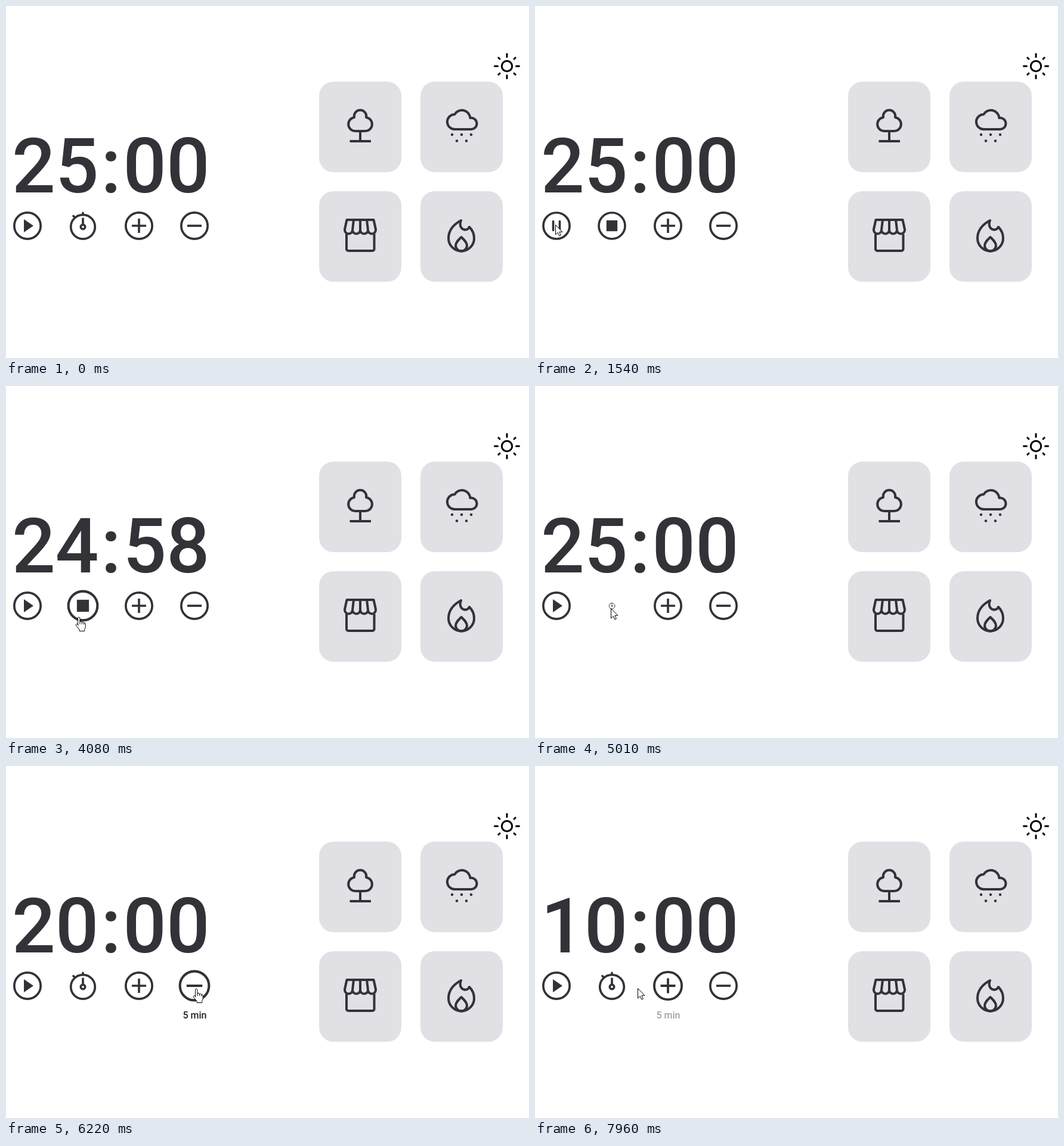
Write an HTML page that moves like this. It is 877 px wide and 591 px high and loops after 8000 ms.

```html
<!DOCTYPE html>
<html lang="en">
<head>
<meta charset="utf-8">
<title>Focus timer</title>
<style>
  html, body { margin: 0; width: 100%; height: 100%; overflow: hidden; background: #fff; }
  svg { display: block; width: 877px; height: 591px; font-family: Roboto, sans-serif; font-weight: 500; text-anchor: middle; }
  .line { fill: none; stroke: #323238; stroke-width: 4; stroke-linejoin: round; }
  .button { fill: none; stroke: #323238; stroke-width: 3.7; }
  .solid { fill: #323238; stroke: none; }
  .round { stroke-linecap: round; }
  .digits { font-size: 128px; fill: #323238; }
  .label { font-size: 16px; fill: #202024; }
  .cursor { fill: #fff; stroke: #000; stroke-width: 1; stroke-linejoin: round; }
</style>
</head>
<body>
<svg viewBox="0 0 877 591">
  <g fill="#e1e0e5">
    <rect x="525" y="127" width="138" height="152" rx="24"/>
    <rect x="695" y="127" width="138" height="152" rx="24"/>
    <rect x="525" y="311" width="138" height="152" rx="24"/>
    <rect x="695" y="311" width="138" height="152" rx="24"/>
  </g>

  <g class="line">
    <path d="M587 210h14a11.6 11.6 0 0 0 3-23a10.2 10.2 0 1 0-20 0a11.6 11.6 0 0 0 3 23zM594 210v17M576.500 227h35.500"/>
    <path d="M752.500 207h26.200a9.6 9.6 0 1 0-.4-19a13.9 13.900 0 0 0-26-6a12.500 12.500 0 0 0 .2 25z"/>
    <path d="M571.500 359h45l3.500 16v1a6.500 6.500 0 0 1-13 0a6.500 6.500 0 0 1-13 0a6.500 6.500 0 0 1-13 0a6.500 6.500 0 0 1-13 0v-1zM583 359l-2 17M594 359v17M605 359l2 17"/>
    <path d="M571 383v25a3 3 0 0 0 3 3h40.500a3 3 0 0 0 3-3v-25"/>
    <path d="M763 360c-4 10 2 16.500 8 15.500c3-.3 5-2 6-4.500c6 6 8 12 8 19a21.500 21.500 0 0 1-43 0c0-14 10-24 21-30z"/>
    <path d="M763.500 388c5 5 9.500 9 9.500 14a9.500 9.500 0 0 1-19 0c0-5 4.500-9 9.500-14z"/>
  </g>
  <path d="M748 216h0M764 216h0M780 216h0M756 226.500h0M772 226.500h0" stroke="#323238" stroke-width="4.500" stroke-linecap="round"/>

  <g id="sun" transform="translate(840 101)" fill="none" stroke="#000" stroke-width="3" stroke-linecap="round">
    <circle r="8.700"/>
  </g>

  <g class="digits">
    <text id="minutes" x="82.800" y="313">25</text>
    <text x="176" y="313">:</text>
    <text id="seconds" x="269" y="313">00</text>
  </g>

  <g id="main" class="button">
    <circle r="22.150"/>
    <path id="play" class="solid" d="M-6-11L10 0L-6 11z"/>
    <path id="pause" class="round" d="M-5.500-7.400V7.400M5.500-7.400V7.400"/>
  </g>
  <g id="mode" class="button">
    <g id="stop">
      <circle r="22.150"/>
      <rect class="solid" x="-9.200" y="-9.200" width="18.400" height="18.400"/>
    </g>
    <g id="watch" class="round">
      <circle cy="1.850" r="20.300"/>
      <circle cy="1.850" r="3.700"/>
      <path d="M0-2V-12M0-19.500V-21.700M-14.500-15L-16-16.400"/>
    </g>
  </g>
  <g id="plus" class="button"><circle r="22.150"/><path d="M-12 0H12M0-12V12"/></g>
  <g id="minus" class="button"><circle r="22.150"/><path d="M-12 0H12"/></g>
  <text id="plusLabel" class="label" x="223.500" y="424">5 min</text>
  <text id="minusLabel" class="label" x="316.500" y="424">5 min</text>

  <g id="cursor" class="cursor">
    <path id="arrow" d="M.5.5v16.500l3.800-3.700l2.500 5.700l2.600-1.100l-2.500-5.600h5z"/>
    <path id="hand" d="M-1.500 13.500V1.800a1.700 1.700 0 0 1 3.400 0V7.500q3.200-1 3.400 1q3-.6 3.200 1q2.700-.4 2.700 2.500v4.500q0 2-1.500 4v3h-8.500v-2.500l-5.500-6.500q-1.200-2.500.5-3q1.400-.2 3.300 2zM1.900 7.500v4.500M5.300 8.500v3.500M8.500 9.500v3"/>
  </g>
</svg>
<script>
const LOOP = 8000, FADE = 200;
const $ = id => document.getElementById(id);
const show = (id, on) => $(id).style.display = on ? "" : "none";

for (let i = 0; i < 8; i++) {
  const ray = document.createElementNS("http://www.w3.org/2000/svg", "path");
  ray.setAttribute("d", i % 2 ? "M17 0H20" : "M15.500 0H20.500");
  ray.setAttribute("transform", `rotate(${i * 45})`);
  $("sun").append(ray);
}

// Hover spans per button, and the moments its icon is swapped and grows in.
const buttons = {
  main:  { x: 36,    hover: [[790, 1350], [2440, 3470], [3560, 3790]], swaps: [1350, 3470] },
  mode:  { x: 129,   hover: [[3880, 4950]], swaps: [1350, 4950] },
  plus:  { x: 223,   hover: [[5430, 5870], [7580, 7850]], swaps: [] },
  minus: { x: 316,   hover: [[5960, 7430]], swaps: [] }
};
const clock = [[0, "25:00"], [2400, "24:59"], [3400, "24:58"], [4950, "25:00"],
               [6200, "20:00"], [6610, "15:00"], [6950, "10:00"]];
// Pointer path: time, x, y
const path = [[190, 716, 559], [420, 500, 500], [640, 190, 420], [780, 60, 385], [940, 34, 367],
              [3700, 34, 367], [3950, 112, 385], [4140, 127, 390], [4280, 127, 390], [4410, 127, 373],
              [5250, 127, 373], [5430, 198, 372], [5600, 241, 371], [5800, 241, 371], [6080, 319, 374],
              [7350, 319, 374], [7850, 197, 372], [7950, 172, 373]];

const ease = p => (p = Math.min(1, Math.max(0, p)), p * p * (3 - 2 * p));
const hoverAmount = (spans, t) =>
  spans.reduce((sum, [from, to]) => sum + ease((t - from) / FADE) - ease((t - to) / FADE), 0);

function pointer(t) {
  const i = path.findIndex(p => p[0] > t);
  if (i < 1) return path.at(i).slice(1);
  const [t0, x0, y0] = path[i - 1], [t1, x1, y1] = path[i];
  const p = (t - t0) / (t1 - t0);
  return [x0 + (x1 - x0) * p, y0 + (y1 - y0) * p];
}

function draw(t) {
  const [minutes, seconds] = clock.findLast(c => c[0] <= t)[1].split(":");
  $("minutes").textContent = minutes;
  $("seconds").textContent = seconds;

  for (const [id, { x, hover, swaps }] of Object.entries(buttons)) {
    const swap = swaps.findLast(s => s <= t) ?? -FADE;
    const amount = hoverAmount(hover, t);
    const scale = ease((t - swap) / FADE) * (1 + 0.1 * amount);
    $(id).setAttribute("transform", `translate(${x} 369) scale(${scale})`);
    const label = $(id + "Label");
    if (label) label.style.opacity = amount;
  }
  const running = t >= 1350 && t < 3470, started = t >= 1350 && t < 4950;
  show("pause", running);
  show("play", !running);
  show("stop", started);
  show("watch", !started);

  const hovering = Object.values(buttons).some(b => b.hover.some(([from, to]) => t >= from && t < to));
  show("cursor", t >= 190);
  show("hand", hovering);
  show("arrow", !hovering);
  $("cursor").setAttribute("transform", `translate(${pointer(t).map(Math.round)})`);
}

const start = performance.now();
function frame() {
  draw((performance.now() - start) % LOOP);
  requestAnimationFrame(frame);
}
frame();
</script>
</body>
</html>
```
